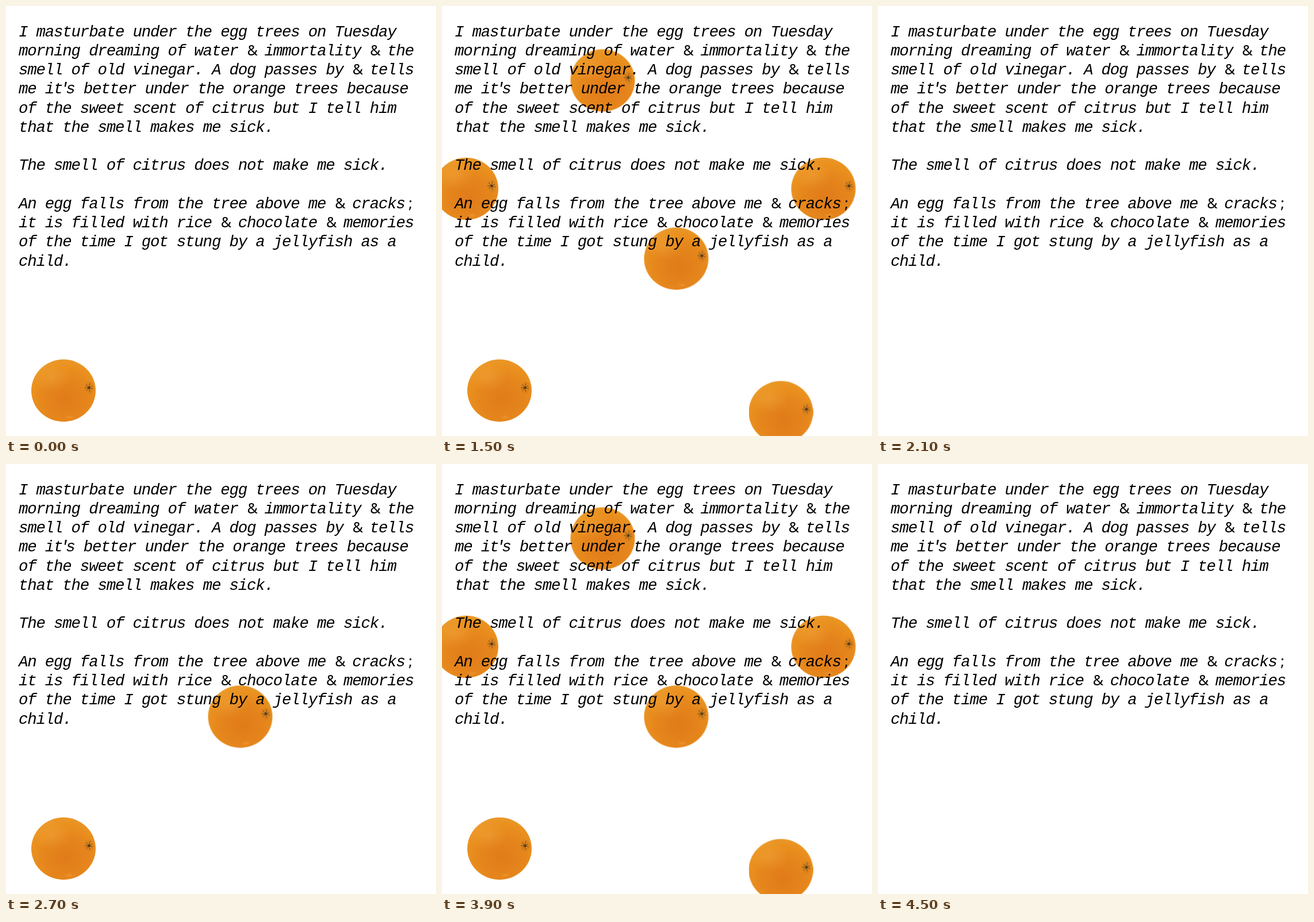
An HTML page for the animation above (4.8 s loop, 748 by 748 pixels).

```html
<!DOCTYPE html>
<html lang="en">
<head>
<meta charset="utf-8">
<title>Citrus poem</title>
<style>
  html, body { margin: 0; width: 100%; height: 100%; overflow: hidden; background: #fff; }
  svg { display: block; width: 100vw; height: 100vh; }
  text { font: italic 27.4px "Liberation Mono", monospace; white-space: pre; fill: #000; }
  text.upright { font: 25px "Noto Sans", sans-serif; text-anchor: middle; }
</style>
</head>
<body>
<svg viewBox="0 0 748 748">
  <defs>
    <radialGradient id="peel" cx=".54" cy=".64" r=".66">
      <stop offset="0" stop-color="#e17b1a"/>
      <stop offset=".5" stop-color="#e5851c"/>
      <stop offset=".82" stop-color="#ea911f"/>
      <stop offset="1" stop-color="#e99a2c"/>
    </radialGradient>
    <radialGradient id="glow">
      <stop offset="0" stop-color="#f6b04a" stop-opacity=".35"/>
      <stop offset="1" stop-color="#f6b04a" stop-opacity="0"/>
    </radialGradient>
    <g id="orange">
      <ellipse rx="56" ry="54.2" fill="url(#peel)"/>
      <ellipse cx="-20" cy="-24" rx="34" ry="26" fill="url(#glow)"/>
      <ellipse cx="10" cy="46" rx="9" ry="4" fill="url(#glow)"/>
      <ellipse cx="45" cy="-5" rx="8" ry="11" fill="#c8761c" opacity=".3"/>
      <path d="M44-5L39-11M44-5L46-13M44-5L50-8M44-5L51-3M44-5L46 2M44-5L40 0M44-5L37-5" stroke="#6d4a1c" stroke-width="1" fill="none"/>
      <circle cx="44.5" cy="-5" r="2.2" fill="#4d3a1c"/>
    </g>
  </defs>
  <g id="fruit"></g>
  <g id="poem"></g>
</svg>
<script>
const LOOP = 2400, STEPS = 8, CLEAR_STEP = 6;
const LEFT = 22, ADVANCE = 15.27, APOSTROPHE = 5.8, BASELINE = 52.7, LEADING = 33.25;
const TRACKING = ADVANCE - 27.4 * 0.6;

// Centres in order of appearance
const centres = [[100, 669], [407.5, 439.5], [279.5, 129.5], [663.5, 318], [589.5, 706.5], [42, 318]];

const lines = [
  "I masturbate under the egg trees on Tuesday",
  "morning dreaming of water & immortality & the",
  "smell of old vinegar. A dog passes by & tells",
  "me it's better under the orange trees because",
  "of the sweet scent of citrus but I tell him",
  "that the smell makes me sick.",
  "",
  "The smell of citrus does not make me sick.",
  "",
  "An egg falls from the tree above me & cracks;",
  "it is filled with rice & chocolate & memories",
  "of the time I got stung by a jellyfish as a",
  "child."
];

function add(parent, name, attrs, content = "") {
  const node = document.createElementNS("http://www.w3.org/2000/svg", name);
  for (const key in attrs) node.setAttribute(key, attrs[key]);
  node.textContent = content;
  return document.getElementById(parent).appendChild(node);
}

lines.forEach((line, row) => {
  const y = BASELINE + row * LEADING;
  let x = LEFT;
  for (const part of line.split(/([&;'])/)) {
    if (!part) continue;
    if (part === "&" || part === ";") {
      add("poem", "text", { class: "upright", x: x + ADVANCE / 2 + 2, y }, part);
    } else {
      const shift = part === "'" ? -4.5 : 0;
      add("poem", "text", { x: x + shift, y, "letter-spacing": TRACKING }, part);
    }
    x += part === "'" ? APOSTROPHE : part.length * ADVANCE;
  }
});

centres.forEach(([x, y], i) => {
  add("fruit", "use", { href: "#orange", x, y }).animate([
    { opacity: 0, offset: 0, easing: "step-end" },
    { opacity: 1, offset: i / STEPS, easing: "step-end" },
    { opacity: 0, offset: CLEAR_STEP / STEPS, easing: "step-end" },
    { opacity: 0, offset: 1 }
  ], { duration: LOOP, iterations: Infinity });
});
</script>
</body>
</html>
```
